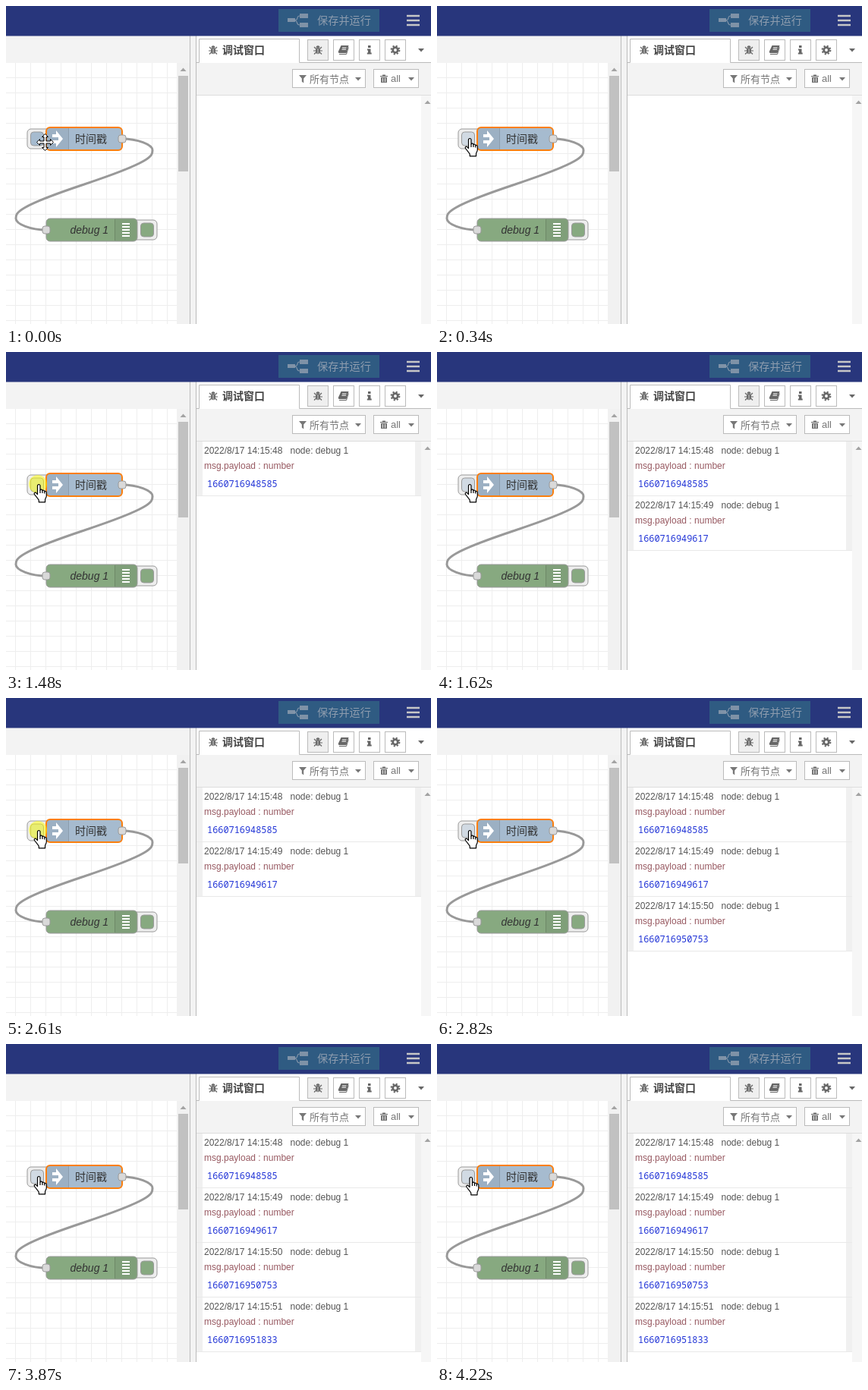
An HTML page for the animation above (4290 ms loop, 560 by 419 pixels).

```html
<!DOCTYPE html>
<html lang="zh">
<head>
<meta charset="utf-8">
<title>调试窗口</title>
<style>
html, body { margin: 0; width: 100%; height: 100%; overflow: hidden; background: #fff; }
svg { display: block; width: 100vw; height: 100vh; }
text { font-family: "Liberation Sans", "Noto Sans CJK SC", "Noto Sans CJK", sans-serif; white-space: pre; }
.cjk { font-family: "Noto Sans CJK SC", "Noto Sans CJK", sans-serif; }
.num { font-family: "Noto Sans Mono", monospace; font-size: 11.9px; fill: #2033d6; }
</style>
</head>
<body>
<svg viewBox="0 0 560 419" preserveAspectRatio="none">
  <defs>
    <pattern id="grid" x="12" y="74" width="20" height="20" patternUnits="userSpaceOnUse">
      <path d="M0 .5H20M.5 0V20" stroke="#eee"/>
    </pattern>
    <g id="bug">
      <ellipse cy="1" rx="3" ry="4.2"/>
      <path d="M-2.5-3.2a2.5 2.5 0 0 1 5 0z"/>
      <path d="M-6 1H6M-5-4L-2.5-1.5M5-4L2.5-1.5M-5 5.5L-2.5 3M5 5.5L2.5 3" stroke="#666" stroke-width="1.2"/>
      <path d="M0-2V5" stroke="#eee" stroke-width=".8"/>
    </g>
    <path id="caret" d="M-4-2H4L0 2.5z"/>
  </defs>

  <!-- workspace -->
  <rect width="560" height="419" fill="#fff"/>
  <rect y="39" width="250" height="380" fill="#f3f3f3"/>
  <rect y="75" width="225" height="344" fill="#fff"/>
  <rect y="75" width="225" height="344" fill="url(#grid)"/>
  <rect x="225" y="75" width="17" height="344" fill="#f1f1f1"/>
  <path d="M229.500 86h8l-4-4.500z" fill="#a3a3a3"/>
  <rect x="227" y="92" width="13" height="126" fill="#c1c1c1"/>
  <path d="M242.500 39V419M250.500 39V419" stroke="#bbb"/>

  <!-- flow -->
  <g stroke="#999">
    <path d="M153 175C173 175 193 182.500 193 190C193 197.500 193 205 103 235C13 265 13 272.500 13 280C13 287.500 33 295 53 295" fill="none" stroke-width="3"/>
    <rect x="28" y="162" width="32" height="26" rx="5" fill="#eee"/>
    <rect id="key" x="32.500" y="166" width="17" height="18" rx="4"/>
    <rect x="53" y="160" width="100" height="30" rx="5" fill="#a6bbcf" stroke="#ff7f0e" stroke-width="2"/>
    <rect x="167" y="282" width="32" height="26" rx="5" fill="#eee"/>
    <rect x="177.500" y="286" width="17" height="18" rx="4" fill="#87a980"/>
    <rect x="53" y="280" width="120" height="30" rx="5" fill="#87a980"/>
    <rect x="148" y="170" width="10" height="10" rx="3" fill="#d9d9d9"/>
    <rect x="48" y="290" width="10" height="10" rx="3" fill="#d9d9d9"/>
  </g>
  <path d="M54 161h28v28h-28zM143.500 280.500h24a5 5 0 0 1 5 5v19a5 5 0 0 1-5 5h-24z" opacity=".06"/>
  <path d="M82.500 161v28M143.500 281v28" stroke="#000" stroke-opacity=".16"/>
  <path d="M66 164l9 11-9 11v-5h-5v-4h8v-4h-8v-4h5z" fill="#fff"/>
  <path d="M153 287h10M153 291h10M153 295h10M153 299h10M153 303h10" stroke="#fff" stroke-width="2"/>
  <text class="cjk" x="91" y="180" font-size="14" fill="#333">时间戳</text>
  <text x="84.500" y="300" font-size="14" font-style="italic" fill="#333">debug 1</text>

  <!-- header -->
  <rect width="560" height="39.500" fill="#28367c"/>
  <rect x="359" y="4" width="133" height="30" fill="#2f5b82"/>
  <g fill="#8d9cae">
    <path d="M371 16h10v5h-10zM387 10h11v6h-11zM387 22h11v6h-11z" opacity=".85"/>
    <path d="M381 18.500C386 18.500 382 13 387 13M379 18.500C386 18.500 381 25 387 25" fill="none" stroke="#8d9cae" stroke-width="1.200" opacity=".85"/>
    <text class="cjk" x="410" y="24" font-size="14.200">保存并运行</text>
  </g>
  <path d="M528 13h17M528 19h17M528 25h17" stroke="#c7c7c7" stroke-width="2.600"/>

  <!-- sidebar -->
  <rect x="251" y="75" width="309" height="43" fill="#f3f3f3"/>
  <path d="M251 74.500H254.500V43.500H386.500V74.500H560" fill="none" stroke="#bbb"/>
  <path d="M251 117.500H560" stroke="#ddd"/>
  <g fill="#fff" stroke="#bbb">
    <rect x="397.500" y="44.500" width="27" height="27" fill="#efefef"/>
    <rect x="431.500" y="44.500" width="27" height="27"/>
    <rect x="465.500" y="44.500" width="27" height="27"/>
    <rect x="499.500" y="44.500" width="27" height="27"/>
    <rect x="377.500" y="83.500" width="96" height="24"/>
    <rect x="484.500" y="83.500" width="59" height="24"/>
  </g>
  <g fill="#666">
    <use href="#bug" x="273" y="58"/>
    <use href="#bug" x="411" y="58"/>
    <text class="cjk" x="285" y="63" font-size="14" font-weight="700" fill="#444">调试窗口</text>
    <path d="M441.500 52h10l-3 10h-9c-2 0-2-2-1.200-3z"/>
    <path d="M439 63.500h9.500l2.800-9" fill="none" stroke="#666"/>
    <path d="M443 55h5.500M442.500 57.200h5.500" stroke="#fff"/>
    <path d="M477 52h3.500v3h-3.500zM476 56.500h4.500v5h1.200v2h-5.900v-2h1.200v-3h-1z"/>
    <circle cx="513" cy="58" r="3.300" fill="none" stroke="#666" stroke-width="2.800"/>
    <circle cx="513" cy="58" r="5.400" fill="none" stroke="#666" stroke-width="2" stroke-dasharray="2.120"/>
    <use href="#caret" x="547" y="58"/>
  </g>
  <g fill="#777">
    <path d="M386 91h10l-3.800 4.500v6l-2.400-2v-4z"/>
    <text class="cjk" x="400" y="100.500" font-size="13">所有节点</text>
    <use href="#caret" x="464" y="96"/>
    <path d="M493 92h10v1.300h-10zM496 90.500h4v1.500h-4zM494 94h8v7h-8z"/>
    <path d="M496.500 95v5M499.500 95v5" stroke="#fff" stroke-width=".8"/>
    <text x="507" y="100" font-size="13">all</text>
    <use href="#caret" x="534" y="96"/>
  </g>
  <rect x="547" y="118" width="13" height="301" fill="#f6f6f6"/>
  <path d="M551.500 129h8l-4-4.500z" fill="#a3a3a3"/>
  <g id="log"></g>

  <!-- pointer -->
  <circle id="flash" r="12" fill="#ff0" fill-opacity=".5"/>
  <path id="cross" transform="translate(51.500 179.500)" d="M0-11L4-7H1.500V-1.500H7V-4L11 0L7 4V1.500H1.500V7H4L0 11L-4 7H-1.500V1.500H-7V4L-11 0L-7-4V-1.500H-1.500V-7H-4z" fill="#fff" stroke="#000"/>
  <g id="hand" stroke="#000" stroke-width="1.200" stroke-linejoin="round">
    <path d="M5 3C5 .3 8.500 .3 8.500 3V8.500C9 7.200 11.500 7.400 11.500 9.300C12 8.200 14.300 8.600 14.300 10.300C15 9.500 16.800 9.800 16.800 11.500V16C16.800 18.500 15 19.500 15 21.500V24.300H6.800V21.800C5.800 19.500 3 17 1 14C0 12 2 11 3.200 12.200L5 14z" fill="#fff"/>
    <path d="M8.500 8.500V12.500M11.500 9.300V12.500M14.300 10.300V13" fill="none"/>
  </g>
</svg>
<script>
const LOOP = 4290;
const $ = id => document.getElementById(id);

const messages = [
  [610, 48, 1660716948585],
  [1620, 49, 1660716949617],
  [2750, 50, 1660716950753],
  [3870, 51, 1660716951833]
];
const clicks = [[470, 540], [1480, 1550], [2610, 2680], [3680, 3810]];
// time, hand x, hand y
const moves = [[0, 38, 177], [70, 38, 177], [140, 37, 175], [210, 36.5, 173.5], [4220, 38, 174.5]];

$("log").innerHTML = messages.map(([, sec, value], i) => `
  <g transform="translate(0 ${118 + 72 * i})">
    <path d="M251 0h8v72h-8zM539 0h8v72h-8z" fill="#f0f0f0"/>
    <path d="M251 71.500H547" stroke="#e9e9e9"/>
    <g font-size="12">
      <text x="261" y="16" fill="#555">2022/8/17 14:15:${sec}</text>
      <text x="374.500" y="16" fill="#555">node: debug 1</text>
      <text x="261" y="36" fill="#985a62">msg.payload : number</text>
    </g>
    <text class="num" x="265" y="60">${value}</text>
  </g>`).join("");
const rows = [...$("log").children];

const show = (el, on) => el.setAttribute("visibility", on ? "visible" : "hidden");

function draw(t) {
  const [, x, y] = moves.filter(m => m[0] <= t).pop();
  const over = t >= 70;
  show($("cross"), !over);
  show($("hand"), over);
  $("hand").setAttribute("transform", `translate(${x} ${y})`);
  show($("flash"), clicks.some(([from, to]) => t >= from && t < to));
  $("flash").setAttribute("cx", x + 5.5);
  $("flash").setAttribute("cy", y + 0.5);
  $("key").setAttribute("fill", over ? "#d1dae3" : "#a6bbcf");
  rows.forEach((row, i) => show(row, t >= messages[i][0]));
}

const start = performance.now();
function tick() {
  draw((performance.now() - start) % LOOP);
  requestAnimationFrame(tick);
}
tick();
</script>
</body>
</html>
```
